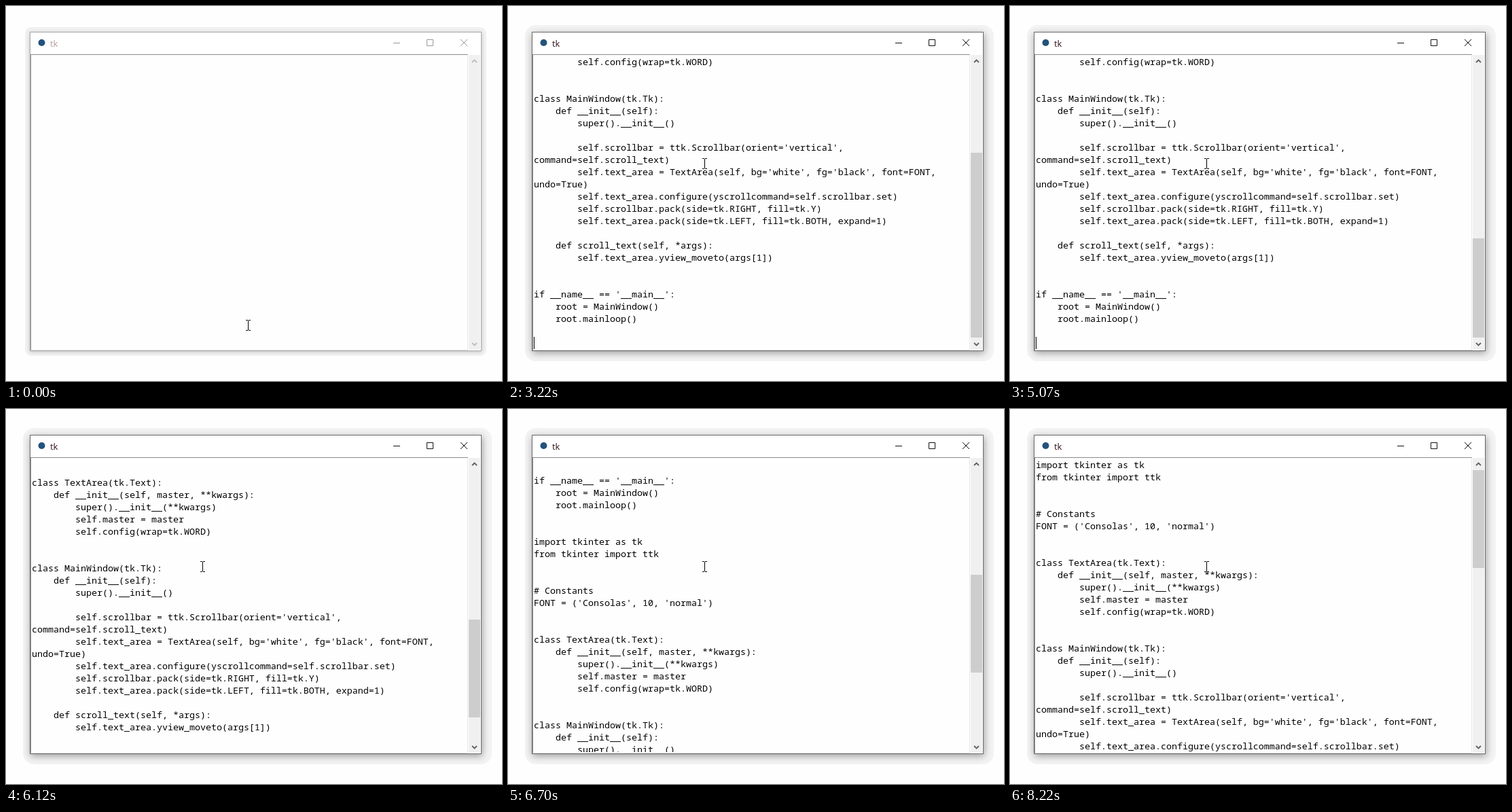
An HTML page that plays this animation: 730x552 px, repeating every 9.59 s.

```html
<!DOCTYPE html>
<html lang="en">
<head>
<meta charset="utf-8">
<title>tk</title>
<style>
  html, body { margin: 0; width: 100%; height: 100%; overflow: hidden; background: #fefefe; }
  #stage { position: relative; width: 730px; height: 552px; overflow: hidden; --ink: #999; --edge: #aaa; --title: #b89a9a; }
  #stage.active { --ink: #111; --edge: #6a6a6a; --title: #32101a; }
  #stage div, #stage i, pre, svg { position: absolute; margin: 0; }

  #halo { left: 28px; top: 31px; width: 679px; height: 484px; border-radius: 9px; overflow: hidden; background: #f1f1f1; }
  #halo i { left: 7px; top: 7px; width: 665px; height: 470px; box-shadow: 0 1px 5px rgba(0, 0, 0, .22); }
  .active #halo { left: 25px; top: 28px; width: 690px; height: 495px; border-radius: 16px; background: #f3f3f3; }
  .active #halo i { left: 10px; top: 10px; box-shadow: 1px 3px 10px rgba(0, 0, 0, .36); }

  #window { left: 35px; top: 38px; width: 663px; height: 468px; border: 1px solid var(--edge); background: #fff; }
  #title { left: 65px; top: 46px; font: 13px/18px "Open Sans", "Noto Sans", sans-serif; color: var(--title); }
  #field { left: 36px; top: 71px; width: 642px; height: 434px; border: 1px solid; border-color: #8c8c8c #e6e6e6 #e3e3e3 #8c8c8c; background: #fefefe; }
  #view { left: 38px; top: 73px; width: 641px; height: 432px; overflow: hidden; }
  #code { left: 0; top: 0; font: 13.333px/18px "Noto Sans Mono", "DejaVu Sans Mono", monospace; color: #000; white-space: pre; }
  #caret { left: 0; top: 0; width: 1px; height: 18px; background: #000; }
  #bar { left: 681px; top: 72px; width: 17px; height: 434px; background: #f0f0f0; }
  #thumb { left: 681px; width: 17px; background: #cdcdcd; }
  svg { left: 0; top: 0; fill: none; }
  .controls { stroke: var(--ink); }
  .arrows { stroke: #bdbdbd; stroke-width: 1.8; }
  .active .arrows { stroke: #606060; }
</style>
</head>
<body>
<div id="stage">
  <div id="halo"><i></i></div>
  <div id="window"></div>
  <div id="title">tk</div>
  <div id="field"></div>
  <div id="view"><pre id="code"></pre><div id="caret"></div></div>
  <div id="bar"></div>
  <div id="thumb"></div>
  <svg width="730" height="552">
    <circle cx="52.5" cy="54" r="5" fill="#23527c"/>
    <g class="controls">
      <path d="M570 54.5h10M619.5 49.5h9v9h-9z"/>
      <path d="M669 49l10 10M679 49l-10 10"/>
    </g>
    <path class="arrows" d="M686 83l3.5-3.5 3.5 3.5M686 496l3.5 3.5 3.5-3.5"/>
    <path id="pointer" stroke="#000" shape-rendering="crispEdges"
      d="M-3-7.5h3m1 0h3M-3 7.5h3m1 0h3M.5-7v14"/>
  </svg>
</div>
<script>
const LOOP = 9590, LINE = 18, VIEW = 432;
const TRACK_TOP = 90, TRACK = 378, THUMB_MIN = 20;

const source = `import tkinter as tk
from tkinter import ttk


# Constants
FONT = ('Consolas', 10, 'normal')


class TextArea(tk.Text):
    def __init__(self, master, **kwargs):
        super().__init__(**kwargs)
        self.master = master
        self.config(wrap=tk.WORD)


class MainWindow(tk.Tk):
    def __init__(self):
        super().__init__()

        self.scrollbar = ttk.Scrollbar(orient='vertical',
command=self.scroll_text)
        self.text_area = TextArea(self, bg='white', fg='black', font=FONT,
undo=True)
        self.text_area.configure(yscrollcommand=self.scrollbar.set)
        self.scrollbar.pack(side=tk.RIGHT, fill=tk.Y)
        self.text_area.pack(side=tk.LEFT, fill=tk.BOTH, expand=1)

    def scroll_text(self, *args):
        self.text_area.yview_moveto(args[1])


if __name__ == '__main__':
    root = MainWindow()
    root.mainloop()
`;
const SOURCE_LINES = source.split('\n').length - 1;

// Moments of user input, in ms
const FOCUS = 830;
const pastes = [2010, 4210];
const enters = [3220, 3650, 5070, 5320];
const blinks = [FOCUS, 1380, 1700, 3470, 3770, 5690];
// The scrollbar learns of wrapped lines a little after a paste
const MEASURED = 4380, WRAPPED = 2;
const wheel = [
  { from: 5880, to: 6120, steps: 4, distance: 116 },
  { from: 6120, to: 6330, steps: 3, distance: 77 },
  { from: 6568, to: 6880, steps: 5, distance: 385 },
  { from: 8100, to: 8220, steps: 2, distance: 304 }
];

const $ = id => document.getElementById(id);
const passed = (times, t) => times.filter(time => time <= t).length;
const mix = (a, b, k) => Math.round(a + (b - a) * k);
const easeOut = k => 1 - (1 - k) ** 1.5;

function stepped(t, from, to, steps) {
  const k = Math.min(1, Math.max(0, (t - from) / (to - from)));
  return Math.floor(k * steps) / steps;
}

const lineCount = t => 1 + SOURCE_LINES * passed(pastes, t) + passed(enters, t);

// Each Enter brings the last line into view, then the wheel scrolls back up
function scrollAt(t) {
  const entered = passed(enters, t);
  const bottom = entered ? lineCount(enters[entered - 1]) * LINE - VIEW : 0;
  return wheel.reduce((y, { from, to, steps, distance }) =>
    y - distance * stepped(t, from, to, steps), bottom);
}

function placeThumb(scroll, total) {
  const thumb = $('thumb').style;
  thumb.display = total > VIEW ? 'block' : 'none';
  thumb.top = Math.round(TRACK_TOP + scroll * TRACK / total) + 'px';
  thumb.height = Math.round(THUMB_MIN + VIEW * TRACK / total) + 'px';
}

let shownCopies = 0;
function showCopies(copies) {
  if (copies === shownCopies) return;
  shownCopies = copies;
  $('code').textContent = Array(copies).fill(source).join('\n\n');
}

function draw(t) {
  const lines = lineCount(t);
  const scroll = Math.round(scrollAt(t));
  const copies = passed(pastes, t);
  const k = easeOut(stepped(t, 0, 240, 4));

  $('stage').className = t >= FOCUS ? 'active' : '';
  $('pointer').setAttribute('transform', `translate(${mix(356, 289, k)} ${mix(470, 232, k)})`);

  showCopies(copies);
  $('code').style.top = -scroll + 'px';
  $('caret').style.top = (lines - 1) * LINE - scroll + 'px';
  $('caret').style.visibility = passed(blinks, t) % 2 ? 'visible' : 'hidden';

  const unmeasured = copies === 2 && t < MEASURED ? WRAPPED : 0;
  placeThumb(scroll, (lines - unmeasured) * LINE);
}

const start = performance.now();
function tick() {
  draw((performance.now() - start) % LOOP);
  requestAnimationFrame(tick);
}
tick();
</script>
</body>
</html>
```
